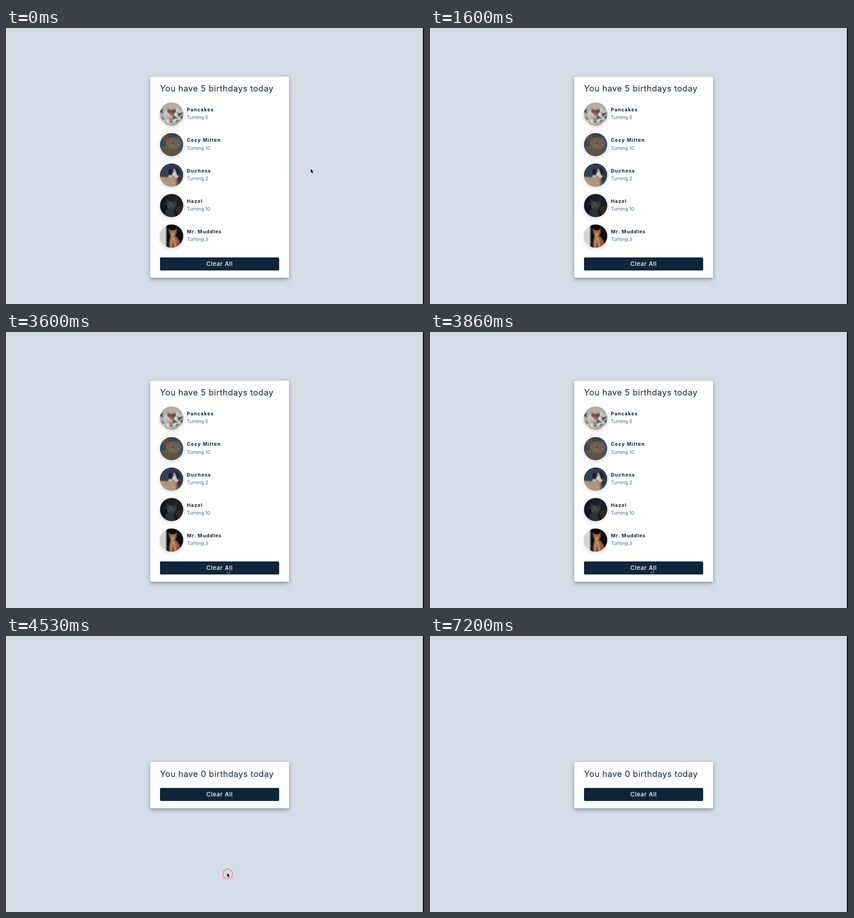
Write an HTML page that moves like this. It is 920x609 px and loops after 7330 ms.

```html
<!DOCTYPE html>
<html lang="en">
<head>
<meta charset="utf-8">
<title>Birthday reminder</title>
<style>
  html, body { margin: 0; width: 100%; height: 100%; overflow: hidden; background: #d4dce8; }
  svg { display: block; width: 100%; height: 100%; }
  text { font-family: Inter, "Liberation Sans", sans-serif; }
  .title { font-size: 18.3px; letter-spacing: .59px; fill: #13273a; }
  .name { font-size: 10.8px; font-weight: 700; letter-spacing: 1.05px; fill: #13222f; }
  .age { font-size: 10.5px; fill: #4f667d; }
  .label { font-size: 13px; font-weight: 500; letter-spacing: .7px; fill: #fff; text-anchor: middle; }
</style>
</head>
<body>
<svg viewBox="0 0 920 609" preserveAspectRatio="none">
  <defs>
    <filter id="cardShadow" x="-10%" y="-20%" width="120%" height="145%">
      <feDropShadow dx="0" dy="3" stdDeviation="4" flood-color="#1c2d40" flood-opacity=".46"/>
    </filter>
    <filter id="faceShadow" x="-40%" y="-40%" width="180%" height="190%">
      <feDropShadow dx="0" dy="3.4" stdDeviation="4.5" flood-color="#000" flood-opacity=".16"/>
    </filter>
    <filter id="soft" x="-20%" y="-20%" width="140%" height="140%">
      <feGaussianBlur stdDeviation=".9"/>
    </filter>
    <clipPath id="round"><circle r="25.5"/></clipPath>
  </defs>
  <rect width="920" height="609" fill="#d4dce8"/>
  <rect x="917.6" width="2.4" height="609" fill="#000"/>
  <g id="card">
    <rect id="panel" x="317.5" width="305.5" rx="2.6" fill="#fff" filter="url(#cardShadow)"/>
    <text id="title" class="title" x="339" y="32.6"></text>
    <g id="list"></g>
    <g id="button">
      <rect x="339" width="262.2" height="28.6" rx="2.6" fill="#0f2538"/>
      <text class="label" x="470" y="18.4">Clear All</text>
    </g>
  </g>
  <circle id="ring" cx="488" cy="525" fill="none" stroke="#f0525f" stroke-opacity=".72"/>
  <path id="cursor" d="M0 0V8.6L2 6.9 3.3 9.9 4.8 9.2 3.5 6.3H6Z"
        fill="#000" stroke="#fff" stroke-width="1.1" stroke-opacity=".85" paint-order="stroke"/>
</svg>
<script>
const LOOP = 7330, STEP = 200 / 3, CLEARED = 4530;
const $ = id => document.getElementById(id);
const set = (el, attrs) => { for (const k in attrs) el.setAttribute(k, attrs[k]); };

const blob = (x, y, rx, ry, fill, turn = 0) =>
  `<ellipse rx="${rx}" ry="${ry}" fill="${fill}" transform="translate(${x} ${y}) rotate(${turn})"/>`;
const shape = (d, fill) => `<path d="${d}" fill="${fill}"/>`;
const backdrop = fill => shape('M-27-27H27V27H-27Z', fill);

function random(seed) {
  return () => (seed = seed * 16807 % 2147483647) / 2147483647;
}

// Knitted blanket: alternating light and dark tufts
function blanket() {
  const rnd = random(71000);
  const tones = ['#dcdad7', '#4a4845', '#c4c1bd', '#77746f', '#e6e4e1', '#343331'];
  let out = '';
  for (let i = 0; i < 54; i++) {
    const x = rnd() * 52 - 26, y = rnd() * 32 - 9;
    out += blob(x, y, 2.4 + rnd() * 3, 1.4 + rnd() * 1.6, tones[i % 6], rnd() * 180);
  }
  return out;
}

const portraits = [
  () => backdrop('#b0adaa') + blob(0, 13, 28, 21, '#b3b0ac') + blanket() +
    shape('M-9-4L-9-13-4-10 3-10 8-13 7-3 2 3-4 2Z', '#6f4637') +
    blob(-2, -4, 5, 4.6, '#96593d') + blob(-2, 0, 2.2, 1.5, '#b89680') +
    blob(-4, -5, 1, 1, '#2c211c') + blob(1, -5, 1, 1, '#2c211c'),

  () => backdrop('#394654') + blob(-17, -16, 8, 7, '#5f5040') +
    blob(20, -3, 9, 14, '#45535f') + blob(-5, 18, 24, 17, '#5d5345') +
    shape('M-13-8L-9-18-3-14 11-14 16-19 19-6Z', '#574e43') +
    blob(3, -3, 16, 13, '#6b6052') + blob(7, 2, 10, 8, '#766a5b') +
    shape('M1-4L7-3 6-1 0-2ZM12-3L17-5 17-3 12-1Z', '#2a2521') +
    blob(9, 1, 2, 1.4, '#3b332c') + shape('M3 6Q9 3 16 6L15 7Q9 5 4 7Z', '#463d34'),

  () => backdrop('#2f3949') + blob(-16, -12, 12, 16, '#354052') + blob(20, 14, 9, 16, '#3a3d47') +
    shape('M-8 6L-6-15 0-10 9-11 15-17 18 8Z', '#171c26') +
    shape('M5-13L7-13 11-2 3-2Z', '#b9b9b9') + blob(6, -2, 4.4, 4, '#d2d1cf') +
    blob(-2, 3, 6, 3, '#bfbdba') + blob(10, 3, 5, 3.5, '#c9c7c4') +
    blob(2, -6, 1.2, 1, '#8c9780') + blob(10, -6, 1.2, 1, '#8c9780') +
    shape('M-27 4L9 6 10 27H-27Z', '#b3957b') + shape('M9 6L13 8 13 27H10Z', '#80685a'),

  () => backdrop('#1a1f22') + blob(18, 13, 9, 13, '#2f2924') +
    blob(-17, -2, 8, 20, '#16191b') + blob(0, 19, 14, 16, '#2e3133') +
    shape('M-12-4L-11-16-4-9 4-9 11-15 10 0 3 9-6 8Z', '#393c3e') +
    blob(-2, 0, 7, 7, '#494b4d') + shape('M-10-8L-10-13-6-9ZM6-8L10-12 9-7Z', '#282526') +
    blob(-5, -1, 1.6, 1.2, '#141717') + blob(3, -1, 1.6, 1.2, '#141717') +
    blob(-1, 4, 2.4, 2, '#2c2f30') + blob(9, 17, 4, 10, '#17191a', -20),

  () => backdrop('#090807') + shape('M-27-27H-12V27H-27Z', '#d3d4d4') +
    shape('M-4 27Q-7 12-2 0H8Q20 10 18 23L12 27Z', '#985d3c') + blob(3, 8, 4.4, 9, '#c08763') +
    shape('M-4-6L-6-16-1-12 6-12 11-16 10-6 5 0-1 0Z', '#a96b48') +
    blob(2.5, -4, 4, 3.4, '#cc9873') + blob(0, -7, 1, 1, '#30221a') + blob(6, -7, 1, 1, '#30221a') +
    blob(2.5, -4, .9, .7, '#8b5443') + blob(-1, 17, 2, 8, '#c48b67') + blob(7, 17, 2, 8, '#c48b67') +
    blob(3, 19, 1.2, 7, '#50311f')
];

const people = [
  ['Pancakes', 5], ['Cozy Mitten', 10], ['Duchess', 2], ['Hazel', 10], ['Mr. Muddles', 3]
];

$('list').innerHTML = people.map(([name, age], i) => {
  const y = 82.5 + i * 67.3;
  return `<g transform="translate(364.5 ${y})">
    <circle r="25.4" fill="#555" filter="url(#faceShadow)"/>
    <g clip-path="url(#round)"><g filter="url(#soft)">${portraits[i]()}</g></g>
    <text class="name" x="33.5" y="-6">${name}</text>
    <text class="age" x="33.5" y="11.4">Turning ${age}</text>
  </g>`;
}).join('');

// Pointer path: time, x, y of the tip
const path = [
  [0, 670.8, 311], [120, 670.8, 311], [730, 533, 518], [1050, 511, 584], [1200, 503, 625],
  [1850, 503, 625], [2330, 494, 568], [2530, 493.4, 560.7], [3330, 486.9, 522.8],
  [5600, 486.9, 523], [5670, 458, 530], [5930, -20, 592], [LOOP, -20, 592]
];

function pointer(t) {
  const i = Math.max(1, path.findIndex(p => p[0] >= t));
  const [t0, x0, y0] = path[i - 1], [t1, x1, y1] = path[i];
  const k = (t - t0) / (t1 - t0);
  return [x0 + (x1 - x0) * k, y0 + (y1 - y0) * k];
}

function draw(ms) {
  // The pointer advances in steps of a fifteenth of a second
  const t = Math.floor((ms + 7) / STEP) * STEP;
  const done = ms >= CLEARED;
  const top = done ? 278 : 107.4, height = done ? 102 : 443.6;
  set($('card'), { transform: `translate(0 ${top})` });
  set($('panel'), { height });
  set($('button'), { transform: `translate(0 ${height - 44.7})` });
  set($('list'), { display: done ? 'none' : 'inline' });
  const title = `You have ${done ? 0 : people.length} birthdays today`;
  if ($('title').textContent !== title) $('title').textContent = title;

  const pressed = ms >= 4400 && ms < 4600;
  const size = done ? .5 : 1;
  set($('ring'), { display: pressed ? 'inline' : 'none', r: 21.4 * size, 'stroke-width': 2.7 * size });
  set($('cursor'), { transform: `translate(${pointer(Math.min(t, LOOP))})` });
}

const start = performance.now();
function tick() {
  draw((performance.now() - start) % LOOP);
  requestAnimationFrame(tick);
}
tick();
</script>
</body>
</html>
```
